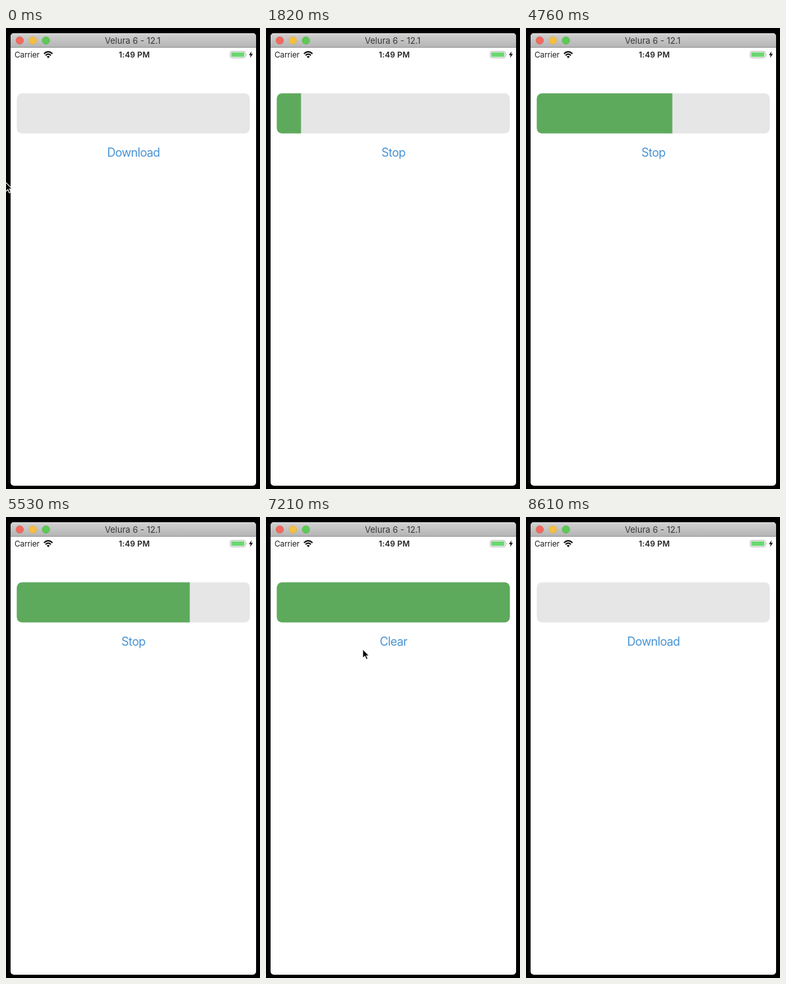
These frames come from a looping animation (388 px wide and 702 px high, 8680 ms). An HTML page:

```html
<!DOCTYPE html>
<html lang="en">
<head>
<meta charset="utf-8">
<title>Download button</title>
<style>
html, body { margin: 0; height: 100%; overflow: hidden; background: #000; }
svg { display: block; width: 388px; height: 702px; font-family: Inter, Roboto, sans-serif; }
</style>
</head>
<body>
<svg viewBox="0 0 388 702">
  <defs>
    <linearGradient id="chrome" x2="0" y2="1">
      <stop stop-color="#d2d2d2"/>
      <stop offset="1" stop-color="#b3b3b3"/>
    </linearGradient>
    <clipPath id="window"><rect x="7" y="8" width="375" height="689" rx="5"/></clipPath>
    <clipPath id="track"><rect x="16.5" y="99.5" width="356" height="61" rx="8"/></clipPath>
  </defs>

  <g clip-path="url(#window)">
    <rect x="7" y="8" width="375" height="689" fill="#fff"/>
    <rect x="7" y="8" width="375" height="22" fill="url(#chrome)"/>
    <path d="M7 8.5H382" stroke="#e2e2e2"/>
    <path d="M7 29.5H382" stroke="#929292"/>
  </g>
  <g stroke-width=".5">
    <circle cx="21" cy="19" r="5.8" fill="#f2695f" stroke="#d9574e"/>
    <circle cx="41" cy="19" r="5.8" fill="#f5bf40" stroke="#dba636"/>
    <circle cx="61" cy="19" r="5.8" fill="#5cc955" stroke="#4bb044"/>
  </g>
  <text x="193.5" y="24" font-size="13" fill="#383838" text-anchor="middle">Velura 6 - 12.1</text>

  <text x="13" y="45" font-size="12" letter-spacing="-.15" fill="#222">Carrier</text>
  <path d="M58 39.2Q64.5 33 71 39.2M60.4 41.7Q64.5 37.8 68.6 41.7" fill="none" stroke="#111" stroke-width="2"/>
  <path d="M62.2 43.5Q64.5 41.6 66.8 43.5L64.5 46Z" fill="#111"/>
  <text x="196" y="45" font-size="12" font-weight="600" letter-spacing=".15" fill="#222" text-anchor="middle">1:49 PM</text>
  <rect x="342.5" y="35.5" width="23" height="10" rx="2.5" fill="#fff" stroke="#b4b4b4"/>
  <rect x="344" y="37" width="20" height="7" rx="1" fill="#6dd873"/>
  <path d="M367 39V42.5Q368.7 40.7 367 39Z" fill="#999"/>
  <path d="M375.2 35.5L371 41.2H373.7L372.8 45.5L377.2 39.4H374.4Z" fill="#111"/>

  <g clip-path="url(#track)">
    <rect x="16" y="99" width="357" height="62" fill="#e6e6e6"/>
    <rect id="fill" x="16" y="99" height="62" fill="#5eaa5c"/>
  </g>
  <text id="label" x="194.7" y="195.5" font-size="18" letter-spacing="-.6" fill="#4993d3" text-anchor="middle"></text>
  <path id="cursor" d="M0 0V14.2L3.3 11.1L5.4 16L8 14.9L5.9 10.2H10Z" fill="#000" stroke="#fff" stroke-width="1.2"/>
</svg>

<script>
const LOOP = 8680, STEP = 70, FULL = 357;
const START = 490, DONE = 6090, CLEAR = 7840;

const [fill, label, cursor] = ["fill", "label", "cursor"].map(id => document.getElementById(id));

const ramp = (t, start, length) => Math.min(1, Math.max(0, (t - start) / length));
const mix = (a, b, p) => a + (b - a) * p;
const easeOut = p => 1 - (1 - p) ** 2;
const easeInOut = p => p < .5 ? 2 * p * p : 1 - 2 * (1 - p) ** 2;

// A steady download whose speed swells and sags, then a final sweep to the end
function progress(t) {
  const s = Math.min(t, DONE) - 1820;
  const loaded = Math.max(0, 37.5 + .058 * s + 12 * Math.sin(s / 471));
  const finished = mix(loaded, FULL, easeInOut(ramp(t, DONE, 840)));
  return finished * (1 - ramp(t, CLEAR, 280));
}

// Glide in from the left edge, rest on the button, glide out again
function visit(t, enter, travel, leave, x, y) {
  const p = easeOut(ramp(t, enter, travel)), q = ramp(t, leave, 350) ** 2;
  return [mix(mix(x, 187, p), -20, q), mix(mix(y, 198, p), 244, q)];
}

function draw(now) {
  const t = Math.floor(now % LOOP / STEP) * STEP;
  fill.setAttribute("width", progress(t));
  label.textContent = t < START || t >= CLEAR ? "Download" : t < DONE ? "Stop" : "Clear";
  const spot = t < LOOP / 2 ? visit(t, 0, 350, 560, -.5, 235) : visit(t, 6860, 620, 7910, -20, 214);
  cursor.setAttribute("transform", `translate(${spot})`);
}

const begin = performance.now();
function tick() {
  draw(performance.now() - begin);
  requestAnimationFrame(tick);
}
tick();
</script>
</body>
</html>
```
